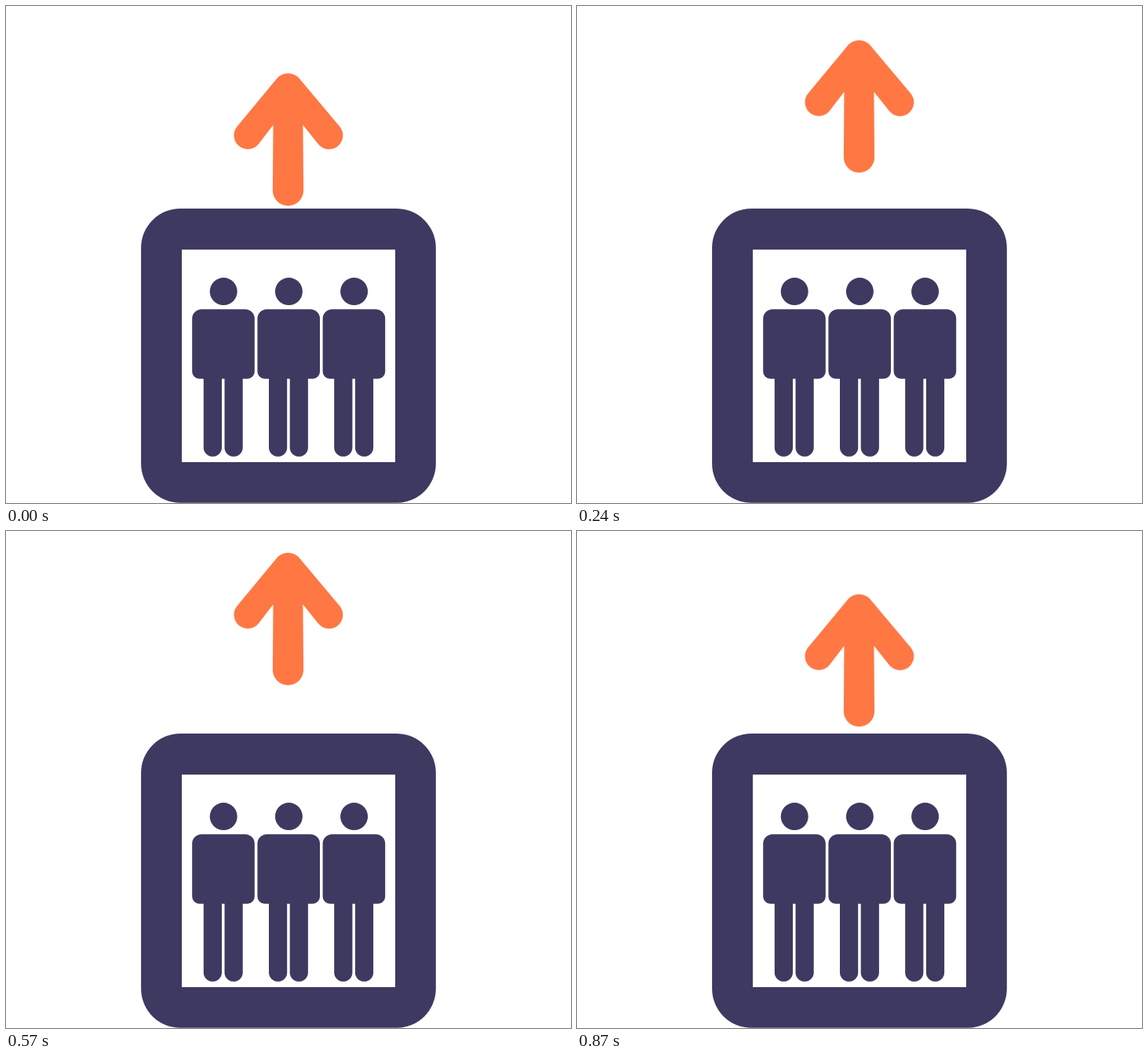
Animation, 720 px wide and 633 px high, one loop 900 ms. Source, as an HTML page:

```html
<!DOCTYPE html>
<html lang="en">
<head>
<meta charset="utf-8">
<title>Elevator going up</title>
<style>
  html, body { margin: 0; width: 100%; height: 100%; overflow: hidden; background: #fff; }
  svg { display: block; width: 720px; height: 633px; }
  .cabin { fill: #3d3960; }
  /* Small head start keeps each step clear of its 30 ms boundary. */
  .arrow { fill: #ff7743; animation: lift 900ms steps(15, end) -2ms infinite; }
  @keyframes lift {
    0%, 100% { transform: translateY(0); }
    50% { transform: translateY(-79.2px); }
  }
</style>
</head>
<body>
<svg viewBox="0 0 720 633">
  <defs>
    <g id="rider">
      <circle cx="277.2" cy="363.6" r="17.5"/>
      <path d="M249.2 386.3H304.8a12 12 0 0 1 12 12V465.7a9 9 0 0 1-9 9H246.2a9 9 0 0 1-9-9V398.3a12 12 0 0 1 12-12z"/>
      <path d="M251.8 474H275V562.2a11.6 11.6 0 0 1-23.2 0z"/>
      <path d="M278.5 474H301.7V562.2a11.6 11.6 0 0 1-23.2 0z"/>
    </g>
  </defs>
  <g class="cabin">
    <rect x="172.1" y="258" width="375.7" height="374.8" rx="50"/>
    <rect x="224" y="310.3" width="272" height="270.6" fill="#fff"/>
    <use href="#rider"/>
    <use href="#rider" x="83.2"/>
    <use href="#rider" x="166.4"/>
  </g>
  <path class="arrow" d="M340.5 151.5L321.3 176.6A17.7 17.7 0 0 1 294.1 154L345.1 92.4A18.7 18.7 0 0 1 373.9 92.4L425.2 153.5A17.6 17.6 0 0 1 398 176.1L378.4 151.5L379.1 234.8A19.6 19.6 0 0 1 339.9 234.8Z"/>
</svg>
</body>
</html>
```
